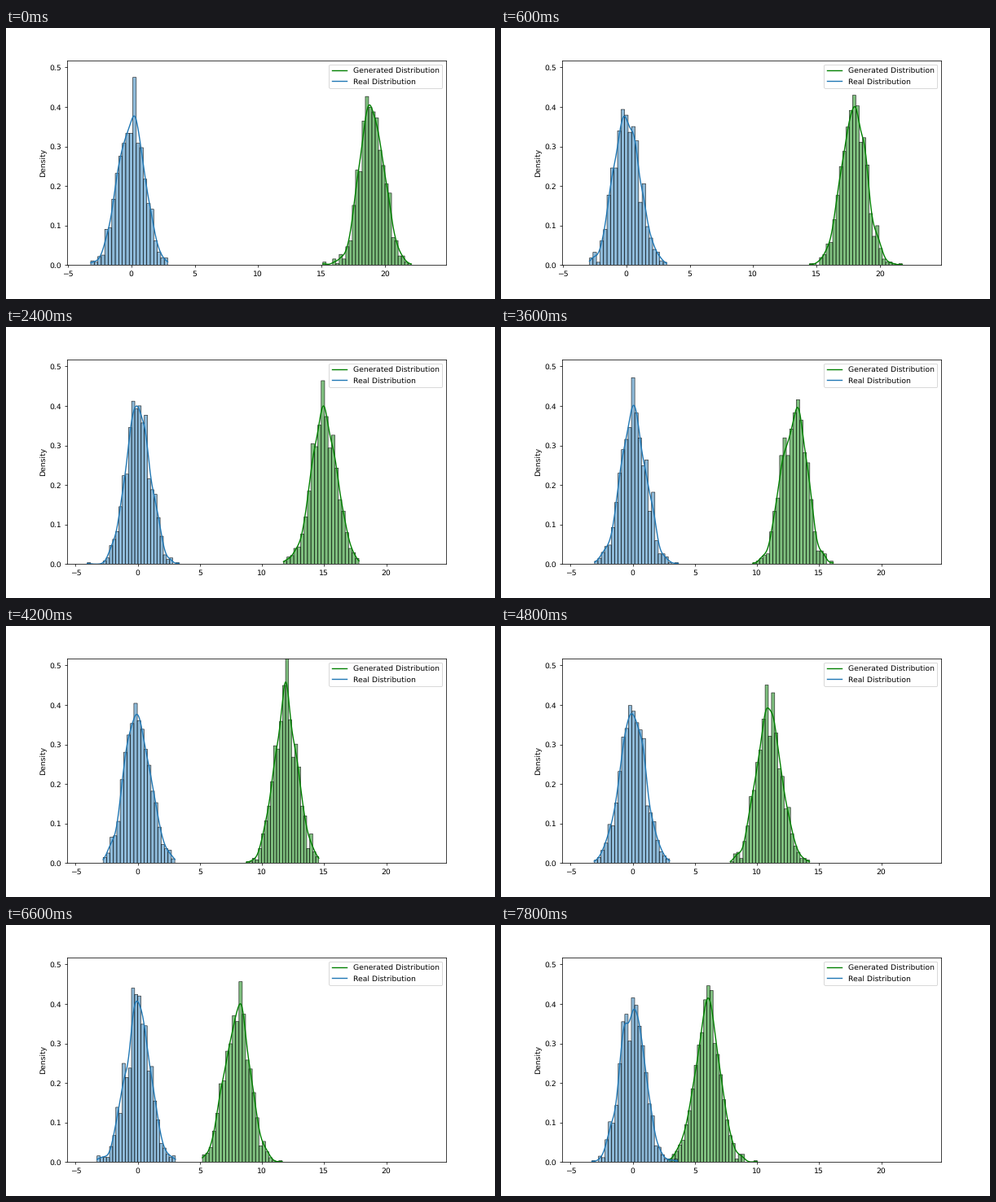
These frames come from a looping animation (600 by 333 pixels, 8 s). A matplotlib script:

```python
import numpy as np
import matplotlib.pyplot as plt
from matplotlib.animation import FuncAnimation

DPI = 64
K = 25 / 24          # point sizes tuned for this dpi
SAMPLES = 1000
STEPS = 14           # distributions shown per loop
HOLD = 3             # frames per distribution
START = 19           # first mean of the generated samples

plt.rcParams.update({
    "font.family": "DejaVu Sans",
    "font.size": 10 * K,
    "text.hinting": "none",
    "axes.linewidth": 0.8 * K,
    "lines.linewidth": 1.5 * K,
    "patch.linewidth": 1.0 * K,
    "xtick.major.size": 3.5 * K, "ytick.major.size": 3.5 * K,
    "xtick.major.width": 0.8 * K, "ytick.major.width": 0.8 * K,
    "xtick.major.pad": 3.5 * K, "ytick.major.pad": 3.5 * K,
    "axes.labelpad": 4 * K,
})


def density(samples):
    """Gaussian kernel estimate between the smallest and largest sample."""
    x = np.linspace(samples.min(), samples.max(), 200)
    width = samples.std() * len(samples) ** -0.2
    z = (x[:, None] - samples) / width
    return x, np.exp(-z ** 2 / 2).mean(axis=1) / (width * np.sqrt(2 * np.pi))


def plot_samples(samples, color, label):
    heights, edges = np.histogram(samples, bins="fd", density=True)
    ax.bar(edges[:-1], heights, np.diff(edges), align="edge", snap=False,
           facecolor=(color, 0.5), edgecolor=("black", 0.85), linewidth=0.7)
    ax.plot(*density(samples), color=color, label=label)


def draw(frame):
    step = frame // HOLD
    rng = np.random.default_rng(step)
    ax.clear()
    # The generated mean walks one unit per step towards the real one
    plot_samples(rng.normal(START - step, 1, SAMPLES),
                 "green", "Generated Distribution")
    plot_samples(rng.normal(0, 1, SAMPLES), "tab:blue", "Real Distribution")
    # The view widens once to take in the farthest sample
    ax.set_xlim(-5.06 if step < 2 else -5.68, 24.82)
    ax.set_ylim(0, 0.5173)
    ax.set_ylabel("Density")
    ax.legend(loc="upper right")


fig = plt.figure(figsize=(600 / DPI, 333 / DPI), dpi=DPI)
ax = fig.add_axes([0.125, 0.125, 0.775, 0.755])

anim = FuncAnimation(fig, draw, frames=40, interval=200,
                     init_func=lambda: draw(0), repeat=True, repeat_delay=0)
plt.show()
```
